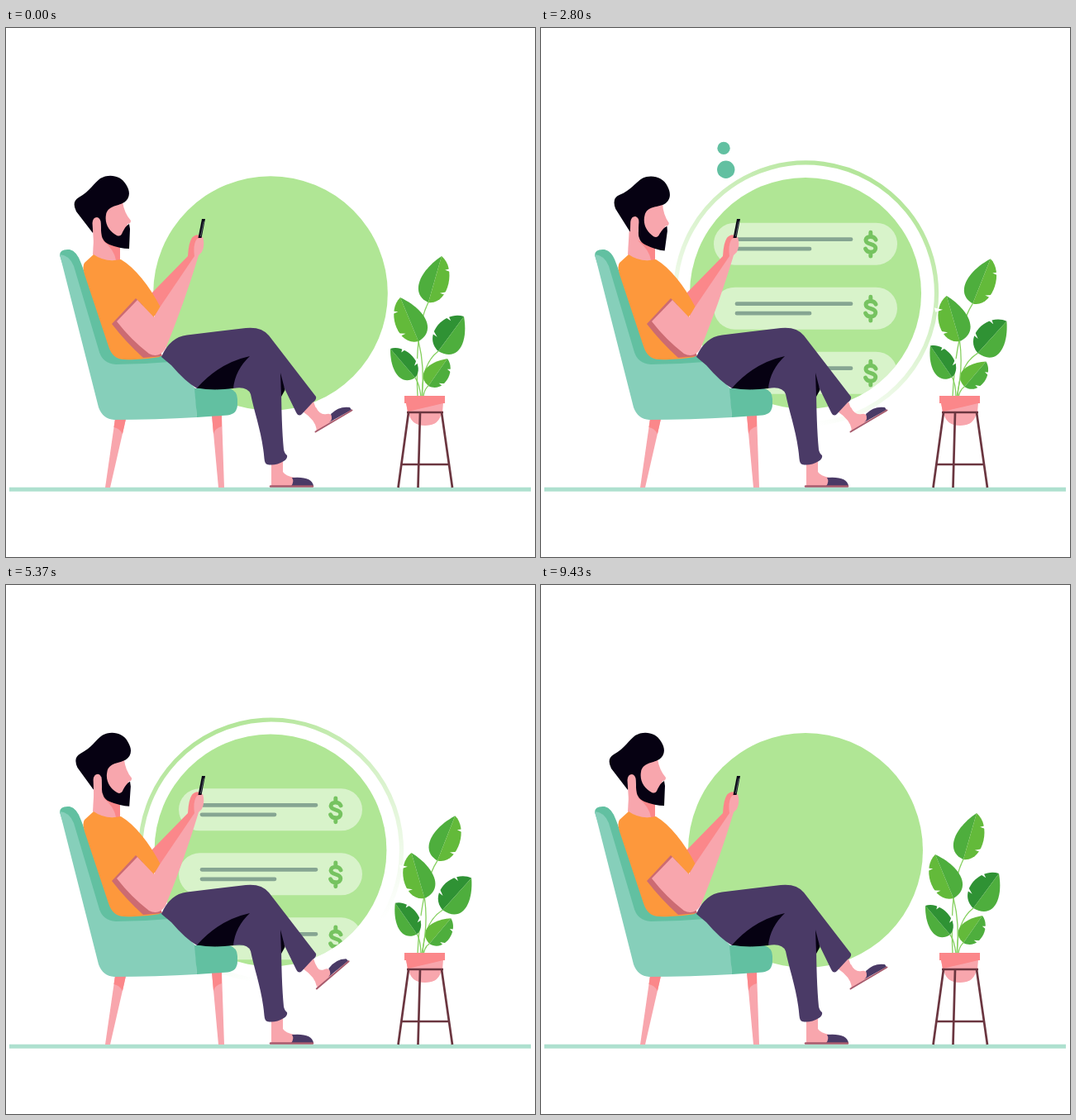
These frames come from a looping animation (640x640 px, 9610 ms). An HTML page:

```html
<!DOCTYPE html>
<html lang="en">
<head>
<meta charset="utf-8">
<title>Reading at home</title>
<style>
html, body { margin: 0; width: 100%; height: 100%; overflow: hidden; background: #fff; }
svg { display: block; width: 100vw; height: 100vh; }
</style>
</head>
<body>
<svg viewBox="0 0 640 640" xmlns="http://www.w3.org/2000/svg">
  <defs>
    <clipPath id="lens"><circle id="lensEdge" cx="320" cy="321" r="142"/></clipPath>
    <linearGradient id="fade" gradientUnits="userSpaceOnUse" x1="158" y1="0" x2="-158" y2="0">
      <stop offset=".08" stop-color="#a6e188" stop-opacity="0"/>
      <stop offset=".5" stop-color="#a6e188" stop-opacity=".36"/>
      <stop offset="1" stop-color="#a6e188" stop-opacity=".85"/>
    </linearGradient>
    <g id="card">
      <rect x="209" width="222" height="51" rx="25.5" fill="#fff"/>
      <path d="M237 20H375M237 31.5H325" stroke="#5d6490" stroke-width="4.8" stroke-linecap="round"/>
      <path d="M398.8 11.5V16M398.800 36V40.500M405 20.500C403 15.500 393 15.500 393 21C393 27 404.800 24.300 404.800 30.600C404.800 36.800 394.600 37 392.600 31.500"
        fill="none" stroke="#3d9f2d" stroke-width="4.900" stroke-linecap="round"/>
    </g>
  </defs>

  <circle id="pulse" cx="320" cy="321" fill="#67bb58"/>
  <circle id="disc" cx="320" cy="321" fill="#b0e695"/>
  <circle id="deep" cx="320" cy="321" fill="#67bb58"/>
  <g id="cards" clip-path="url(#lens)"></g>
  <circle id="ring" r="158" fill="none" stroke="url(#fade)" stroke-width="5.2"/>
  <g id="dots" fill="#62c0a1"></g>

  <rect x="4" y="555.700" width="631" height="5" fill="#aee0cf"/>

  <g id="chair">
    <path d="M132 473H145L126 556H120Z" fill="#f8a6ad"/>
    <path d="M132 473H145L141 491Q137 484 130.500 483Z" fill="#fb878a"/>
    <path d="M249 468H261L264 556H257Z" fill="#f8a6ad"/>
    <path d="M249 468H261V482Q253 484 251 491Z" fill="#fb878a"/>
    <path d="M65 275Q65 267 77 268Q86 270 91 285L130 390Q134 398 150 399L192 396L205 412L140 414L108 410Z" fill="#62c0a1"/>
    <path d="M65 274Q77 275 82 288L112 389Q116 406 133 407Q165 407 198 404L229 436L231 471Q180 474 131 474Q117 473 112 459Z" fill="#86cfba"/>
    <path d="M228 436L270 436Q280 439 280 449V455Q280 467 268 468.500L231 471Z" fill="#62c0a1"/>
  </g>

  <path d="M107 240L105 274Q118 284 138 281V260Z" fill="#f8a6ad"/>
  <path d="M117 257L138 266V281H133Q131 268 117 257Z" fill="#fb878a"/>
  <g id="head">
    <path d="M118 215L141 210Q143 224 151 233Q151 237 147 237L145 256H122Z" fill="#f8a6ad"/>
    <path d="M105 248L85 222Q79 210 88 205C102 197 106 188 114 182C124 176 139 178 145 189C151 198 150 206 143 211C134 216 123 215 121 226C119 237 125 246 134 251Q139 253 141 247Q145 239 149 237L150 243L149 267Q138 267 125 262Q115 258 115 245L114 232Z" fill="#060112"/>
    <path d="M104.500 236Q105 229 110 229Q115 230 114.700 238L115.500 256L106 260Z" fill="#f8a6ad"/>
  </g>

  <path d="M176 321L220 276Q221 256 227 252Q232 248 237 253L231 280L180 349Z" fill="#fb878a"/>
  <path d="M106 274L95 284Q92 288 95 298L124 385Q129 401 143 401Q165 402 186 398L179 349L187 338C173 311 156 290 139 280Q120 284 106 274Z" fill="#fd983c"/>
  <path d="M157 327L128 358Q145 380 166 399L189 397L165 335Z" fill="#cc6b72"/>
  <path d="M159 329L179 350L186 338L228 276Q226 262 231 255L238 253Q241 263 237 271L233 275C222 312 207 354 193 388Q185 400 173 394Q151 377 134 355Z" fill="#f8a6ad"/>
  <path d="M237 231H241L236.500 254H232.500Z" fill="#0c0a18"/>
  <path d="M239.300 234L235.500 252" stroke="#66757a" stroke-width=".8"/>

  <path d="M359 464L372 452Q376 466 384 469L376 486Q374 474 359 464Z" fill="#f8a6ad"/>
  <g id="foot">
    <path d="M366 465L375 459Q380 469 388 467Q394 465 397 474L375 488Q379 477 372 471Z" fill="#f8a6ad"/>
    <path d="M391 477Q396 474 393 467Q403 457 416 459L418 462Z" fill="#4a3a66"/>
    <path d="M374.500 488.500L418.500 462.500" stroke="#a65a6c" stroke-width="2" stroke-linecap="round"/>
  </g>
  <path d="M321 522L335 520V537Q338 542 349 544L348 554H321Z" fill="#f8a6ad"/>
  <path d="M345 554Q349 549 346 544Q370 542 372 554Z" fill="#4a3a66"/>
  <path d="M320 554.500H371" stroke="#a65a6c" stroke-width="2.400" stroke-linecap="round"/>
  <path d="M188 398Q198 374 219 371.500L290 363Q309 361 318 372L375 446Q376 450 371 453L358 467Q354 471 351 465L333 428C333 460 334 490 336 510Q337 515 340 517Q341 521 336 524Q326 530 316 528Q313 527 312.500 521C310 490 300 464 296 443Q292 433 275 436L231 436Q217 428 200 408Z" fill="#4a3a66"/>
  <path d="M231 435.500Q258 405 295 397Q277 414 275 436Q250 439 231 435.500Z" fill="#060112"/>
  <path d="M332 417L337.500 438L333 446Z" fill="#060112"/>

  <g id="plant"></g>
  <path d="M487 464H527Q525 481 507 481Q489 481 487 464ZM484 453H529L528 465H486Z" fill="#f8a6ad"/>
  <path d="M482 445H531V454H529L486 464L484 454H482Z" fill="#fb878a"/>
  <path d="M485 465H529M478 528H537M487 465L474.500 556M501 465L498.500 556M527 465L540 556" fill="none" stroke="#6b3640" stroke-width="2.700"/>
</svg>
<script>
const LOOP = 9.61;
const $ = id => document.getElementById(id);

function add(parent, tag, attrs) {
  const el = document.createElementNS('http://www.w3.org/2000/svg', tag);
  set(el, attrs);
  return parent.appendChild(el);
}

function set(el, attrs) {
  for (const k in attrs) el.setAttribute(k, attrs[k]);
}

const clamp = x => Math.min(1, Math.max(0, x));
const ease = x => (1 - Math.cos(Math.PI * clamp(x))) / 2;
const ramp = (t, a, b) => ease((t - a) / (b - a));

// Eased interpolation through [time, value] pairs
function track(t, keys) {
  let v = keys[0][1];
  for (let i = 1; i < keys.length; i++) {
    v += (keys[i][1] - keys[i - 1][1]) * ramp(t, keys[i - 1][0], keys[i][0]);
  }
  return v;
}

// Plant
const MID = '#4eae3d', LIGHT = '#63ba3a', DARK = '#2f9234';
const leafSpecs = [
  { base: [511, 332], tip: [527, 276], w: 18, left: MID, right: LIGHT, cut: 1, stem: '494 365 498 446' },
  { base: [523, 391], tip: [554, 349], w: 20, left: DARK, right: MID, cut: -1, stem: '502 407 504 446' },
  { base: [495, 423], tip: [465, 388], w: 15, left: MID, right: DARK, cut: 1, stem: '500 430 502 446' },
  { base: [511, 433], tip: [534, 400], w: 15, left: LIGHT, right: MID, cut: 1, stem: '506 437 505 446' },
  { base: [499, 379], tip: [477, 326], w: 19, left: LIGHT, right: MID, cut: -1, stem: '507 410 503 446', bend: .6 }
];

const leaves = leafSpecs.map(s => {
  const g = add($('plant'), 'g', {});
  const [x, y] = s.base, dx = s.tip[0] - x, dy = s.tip[1] - y;
  const len = Math.hypot(dx, dy), turn = Math.atan2(dx, -dy) * 180 / Math.PI;
  add(g, 'path', { d: `M${x} ${y}Q${s.stem}`, fill: 'none', stroke: '#86d060', 'stroke-width': 1.3 });
  const blade = add(g, 'g', { transform: `translate(${x} ${y}) rotate(${turn})` });
  // The notched half is fuller towards the tip
  const half = (side, fill) => {
    const e = side * s.w, full = side === s.cut ? .85 : .56;
    add(blade, 'path', { d: `M0 0C${e * 1.35} ${-len * .06} ${e * 1.2} ${-len * full} 0 ${-len}Z`, fill });
  };
  half(-1, s.left);
  half(1, s.right);
  for (const [at, out] of [[.27, .95], [.76, .8]]) {
    const e = s.cut * s.w * out, m = -len * at;
    add(blade, 'path', { d: `M${e * 1.2} ${m - 4}L${e * .6} ${m + 1}L${e * 1.2} ${m + 1.5}Z`, fill: '#fff' });
  }
  return { g, bend: s.bend || 1 };
});

// Three flicks of the list, three cards each; the last one stays
const flicks = [
  { start: .74, rest: 203, slow: .42, leave: 1.9 },
  { start: 2.07, rest: 203, slow: .42, leave: 4.53 },
  { start: 4.7, rest: 219, slow: .35, leave: 99 }
];
for (const f of flicks) {
  f.cards = [0, 1, 2].map(() => add($('cards'), 'use', { href: '#card' }));
}

function drawCards(t) {
  flicks.forEach((f, n) => {
    const out = Math.max(0, t - f.leave) / .17;
    const y = f.rest + 186 * Math.exp((f.start - t) / f.slow) - 197 * out * out;
    f.cards.forEach((el, i) => {
      let alpha = .5;
      if (n === 2) {
        if (i === 0) alpha *= 1 - ramp(t, 6.25, 6.7);
        if (i === 1) alpha = (.5 + .5 * ramp(t, 6.08, 6.75)) * (1 - ramp(t, 8, 8.6));
        if (i === 2) alpha *= 1 - ramp(t, 5.95, 6.25);
      }
      const top = y + 78 * i;
      const shown = top > 120 && top < 480;
      set(el, { transform: `translate(0 ${shown ? top : 900})`, opacity: alpha });
    });
  });
}

// Bubbles rising from the phone
const bubbles = [[.51, .56], [1.195, 1], [6.405, 1]].map(([start, size]) =>
  ({ start, size, el: add($('dots'), 'circle', {}) }));

function drawBubbles(t) {
  for (const b of bubbles) {
    const p = (t - b.start) / 2.5;
    const y = 232 - 94.5 * p;
    const live = p > 0 && p < 1;
    set(b.el, {
      cx: 230.5 + 9.5 * Math.tanh((y - 182) / 12),
      cy: y,
      r: live ? b.size * (3.5 + 11.2 * p) * clamp(p / .06) : 0,
      opacity: clamp((1 - p) / .05)
    });
  }
}

function tap(t) {
  const start = t < 3 ? .1 : 4.08, end = t < 3 ? 1.9 : 6.78;
  return t > start && t < end ? (1 - Math.cos(2 * Math.PI * (t - start) / .9)) / 2 : 0;
}

function draw(t) {
  const r = t < 7.72 ? 133.2 + 8.8 * Math.cos(2 * Math.PI * (t + .08) / 2.6) : 142;
  for (const id of ['disc', 'deep', 'lensEdge']) set($(id), { r });
  set($('deep'), { opacity: ramp(t, 6.6, 7.2) * (1 - ramp(t, 8.3, 9.25)) });

  const p = clamp((t - 7.05) / .75);
  set($('pulse'), { r: 140 + 52 * ease(p), opacity: p > 0 ? .4 * (1 - p) ** 1.5 : 0 });

  set($('ring'), {
    transform: `translate(320.500 321) rotate(${-70 + 259 * (t - 2.07)})`,
    opacity: ramp(t, .5, .95) * (1 - ramp(t, 5.95, 6.85))
  });

  drawCards(t);
  drawBubbles(t);

  const nod = track(t, [[.1, 0], [1.4, 1], [3.4, 1], [4.3, 0], [4.95, 0], [6.1, 1], [7.5, 1], [9.42, 0]]);
  set($('head'), { transform: `rotate(${5.4 * nod} 122 275)` });
  set($('foot'), { transform: `rotate(${-10.5 * tap(t)} 375 481)` });

  const sway = track(t, [[0, 0], [2.1, 1], [3.95, .15], [6.3, 1], [9.3, 0]]);
  for (const l of leaves) {
    set(l.g, { transform: `rotate(${7.8 * Math.max(0, sway) ** l.bend} 502 446)` });
  }
}

function tick(now) {
  draw(now / 1000 % LOOP);
  requestAnimationFrame(tick);
}
draw(0);
requestAnimationFrame(tick);
</script>
</body>
</html>
```
